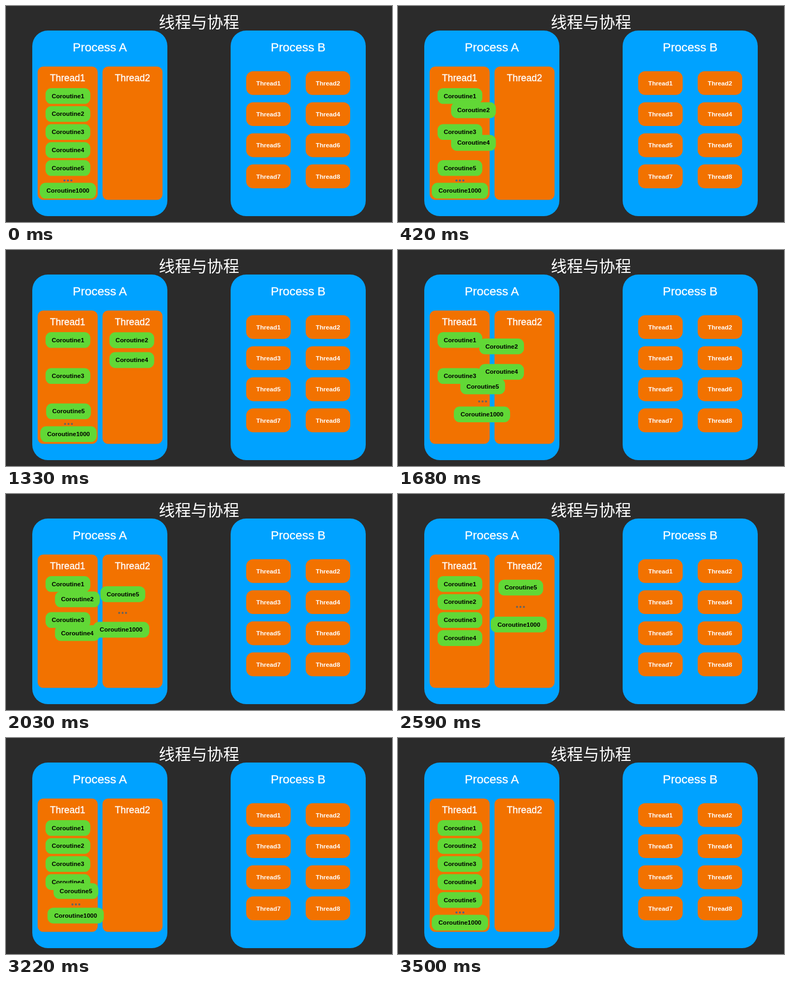
Write an HTML page that moves like this. It is 720 px wide and 405 px high and loops after 5670 ms.

```html
<!DOCTYPE html>
<html lang="zh">
<head>
<meta charset="utf-8">
<title>线程与协程</title>
<style>
html, body { margin: 0; width: 100%; height: 100%; overflow: hidden; background: #2b2b2b; }
svg { display: block; width: 100vw; height: 100vh; }
text { font-family: "Liberation Sans", Arial, sans-serif; text-anchor: middle; fill: #fff; }
.title { font: 500 30px "Noto Sans CJK SC", "Noto Sans CJK", sans-serif; }
.process { font-size: 22.4px; stroke: #fff; stroke-width: .35px; }
.thread { font-size: 17.7px; stroke: #fff; stroke-width: .35px; }
.small { font-size: 11.7px; font-weight: 700; }
.routine { font-size: 11.5px; font-weight: 700; fill: #000; }
</style>
</head>
<body>
<svg id="stage" viewBox="0 0 720 405"></svg>
<script>
const BLUE = '#00a2ff', ORANGE = '#f27200', GREEN = '#61d836';
const LOOP = 5670, STEP = 70, MOVE = 1016;
const STARTS = [112, 1268, 2437];
const stage = document.getElementById('stage');

function add(parent, tag, attrs, content) {
  const el = document.createElementNS('http://www.w3.org/2000/svg', tag);
  for (const key in attrs) el.setAttribute(key, attrs[key]);
  if (content) el.textContent = content;
  parent.append(el);
  return el;
}

function box(parent, x, y, width, height, rx, fill) {
  add(parent, 'rect', { x, y, width, height, rx, fill });
}

function label(parent, cls, x, y, content) {
  add(parent, 'text', { class: cls, x, y }, content);
}

label(stage, 'title', 360, 40.5, '线程与协程');

[['A', 49], ['B', 419]].forEach(([name, x]) => {
  box(stage, x, 46, 252, 348, 29, BLUE);
  label(stage, 'process', x + 126, 84.5, 'Process ' + name);
});

[59, 180].forEach((x, i) => {
  box(stage, x, 113.5, 112, 250, 10.5, ORANGE);
  label(stage, 'thread', x + 56, 141.3, 'Thread' + (i + 1));
});

for (let i = 0; i < 8; i++) {
  const x = 448 + (i % 2) * 111, y = 122.2 + (i >> 1) * 58.3;
  box(stage, x, y, 83, 44.6, 13, ORANGE);
  label(stage, 'small', x + 41.5, y + 26.4, 'Thread' + (i + 1));
}

function pill(n, width) {
  const g = add(stage, 'g');
  box(g, -width / 2, -14.8, width, 29.6, 11, GREEN);
  label(g, 'routine', 0, 3.9, 'Coroutine' + n);
  return g;
}

function ellipsis() {
  const g = add(stage, 'g');
  [-6.4, 0, 6.4].forEach(cx => add(g, 'circle', { cx, cy: 0, r: 1.9 }));
  return g;
}

// Home and away are centres; trip picks the move out and the move back.
const parts = [
  { el: pill(1, 83.5), home: [115.5, 168.8] },
  { el: pill(2, 83.5), home: [115.5, 202.5], away: [235.8, 168.8], trip: [0, 1] },
  { el: pill(3, 83.5), home: [115.5, 236.3], },
  { el: pill(4, 83.5), home: [115.5, 270.1], away: [235.8, 205.8], trip: [0, 1] },
  { el: pill(5, 83.5), home: [115.5, 303.8], away: [235.6, 168], trip: [1, 2] },
  { el: ellipsis(), home: [115.5, 327.2], away: [235, 205], trip: [1, 2], dots: true },
  { el: pill(1000, 105), home: [115.5, 346.3], away: [231.8, 238.8], trip: [1, 2] }
];

function ease(t, start) {
  const u = Math.min(1, Math.max(0, (t - start) / MOVE));
  return (1 - Math.cos(Math.PI * u)) / 2;
}

function draw(time) {
  const t = Math.floor((time % LOOP) / STEP) * STEP;
  for (const { el, home, away = home, trip = [0, 1], dots } of parts) {
    const p = ease(t, STARTS[trip[0]]) - ease(t, STARTS[trip[1]]);
    const [x, y] = home.map((h, i) => h + (away[i] - h) * p);
    el.setAttribute('transform', `translate(${x.toFixed(2)} ${y.toFixed(2)})`);
    if (dots) el.setAttribute('fill', p > 0 ? '#66635f' : '#4a6787');
  }
}

const begin = performance.now();
function tick() {
  draw(performance.now() - begin);
  requestAnimationFrame(tick);
}
tick();
</script>
</body>
</html>
```
